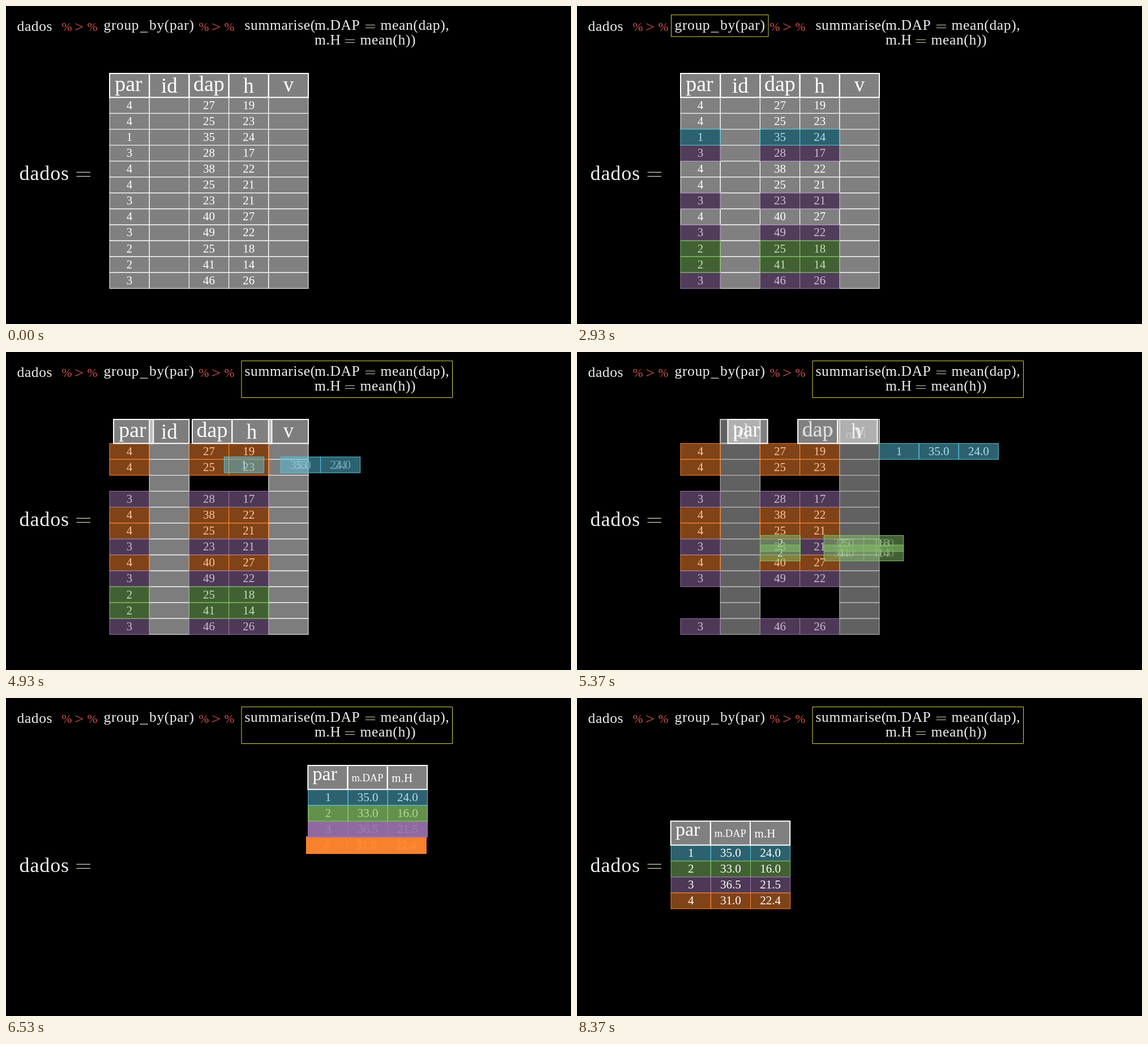
An HTML page that plays this animation: 998 by 561 pixels, repeating every 9110 ms.

```html
<!DOCTYPE html>
<html lang="pt">
<head>
<meta charset="utf-8">
<title>group_by + summarise</title>
<style>
  html, body { margin: 0; width: 100%; height: 100%; overflow: hidden; background: #000; }
  svg { display: block; width: 100%; height: 100%; }
  text { font-family: "Liberation Serif", "Noto Serif", serif; fill: #fff; white-space: pre; }
  .code { fill: #eee; }
  .pipe { fill: #d8544e; }
</style>
</head>
<body>
<svg id="stage" viewBox="0 0 998 561"></svg>
<script>
const LOOP = 9110;
const COL = 70.2, ROW = 28.08, HEAD = 42.3, LEFT = 183, TOP = 119, BODY = TOP + HEAD;
const OUT = 533.3;                       // left edge of the summary table
const COLORS = ['#58C4DD', '#83C167', '#9A72AC', '#FF862F'];
const DATA = [
  [4, 27, 19], [4, 25, 23], [1, 35, 24], [3, 28, 17], [4, 38, 22], [4, 25, 21],
  [3, 23, 21], [4, 40, 27], [3, 49, 22], [2, 25, 18], [2, 41, 14], [3, 46, 26]
];

// Timeline in ms
const STEP = 694, MOVE = 473;
const T = { box: 320, paint: 1014, jump: 3790, gather: 4680, head: 1792, clean: 6572, slide: 7505, slideFor: 700 };

const stage = document.getElementById('stage');

function el(tag, attrs, parent = stage) {
  const node = document.createElementNS('http://www.w3.org/2000/svg', tag);
  set(node, attrs);
  parent.appendChild(node);
  return node;
}
function set(node, attrs) {
  for (const k in attrs) node.setAttribute(k, attrs[k]);
}
function label(str, x, y, size, parent = stage, attrs = {}) {
  const node = el('text', { x, y, 'font-size': size, ...attrs }, parent);
  node.textContent = str;
  return node;
}
const centered = (str, x, y, size, parent) => label(str, x, y, size, parent, { 'text-anchor': 'middle' });
const box = (x, y, w, h, parent, color = '#fff', line = 1) =>
  el('rect', { x, y, width: w, height: h, fill: color, 'fill-opacity': 0.5, stroke: color, 'stroke-width': line }, parent);

const clamp = v => Math.max(0, Math.min(1, v));
const mix = (a, b, s) => a + (b - a) * s;
const sigmoid = x => 1 / (1 + Math.exp(-x));
function smooth(t) {
  const e = sigmoid(-5);
  return clamp((sigmoid(10 * (clamp(t) - 0.5)) - e) / (1 - 2 * e));
}
const phase = (now, start, span) => smooth((now - start) / span);
function tint(hex, s) {
  const n = parseInt(hex.slice(1), 16);
  return `rgb(${[n >> 16, n >> 8 & 255, n & 255].map(c => Math.round(mix(255, c, s)))})`;
}

// Code line
const code = (str, x, y, size = 25.5) => label(str, x, y, size, stage, { class: 'code', 'letter-spacing': size * 0.025 });
function equals(x, y, w, gap, h) {
  for (const dy of [0, gap]) el('rect', { x, y: y + dy, width: w, height: h, fill: '#cfcfb0' });
}
function pipe(x) {
  for (const dx of [0, 45]) label('%', x + dx, 44, 21.5, stage, { class: 'pipe' });
  el('path', { class: 'pipe', d: `M${x + 24} 30.5l14 6.2l-14 6.2v-1.3l11.4 -4.9l-11.4 -4.9z` });
}
code('dados', 19.5, 44);
pipe(98.5);
code('group', 172.5, 42.2);
el('rect', { class: 'code', x: 236.5, y: 45.5, width: 14, height: 1.2 });
code('by(par)', 253, 42.2);
pipe(340.5);
code('summarise(', 421.5, 41.7);
code('m.DAP', 545, 41.7);
equals(635, 33, 17, 5, 1);
code('mean(dap),', 661.5, 41.7);
code('m.H', 545, 68);
equals(599, 59, 17, 5, 1);
code('mean(h))', 625.5, 68);
code('dados', 23.5, 307, 36);
equals(124.5, 292.7, 24.5, 7.2, 1.3);

const frame = el('path', { fill: 'none', stroke: '#d6d648', 'stroke-width': 1, pathLength: 1 });

// Unused columns
const tableLayer = el('g', {});
const spare = el('g', {}, tableLayer);
for (const [col, name, dy] of [[1, 'id', 34], [4, 'v', 32]]) {
  const x = LEFT + col * COL;
  DATA.forEach((_, r) => box(x, BODY + r * ROW, COL, ROW, spare));
  box(x, TOP, COL, HEAD, spare, '#fff', 2);
  centered(name, x + COL / 2, TOP + dy, 37, spare);
}

// Group cells: the rectangles lie above the numbers
const SOURCE_COLS = [0, 2, 3];
const groups = COLORS.map((color, i) => {
  const rows = DATA.map((d, r) => ({ d, r })).filter(o => o.d[0] === i + 1);
  const mean = c => (rows.reduce((sum, o) => sum + o.d[c], 0) / rows.length).toFixed(1);
  return { color, rows, result: [String(i + 1), mean(1), mean(2)], cells: [] };
});
for (const g of [...groups].reverse()) {
  const words = el('g', {}, tableLayer), rects = el('g', {}, tableLayer);
  for (const { d, r } of g.rows) {
    d.forEach((value, k) => {
      const same = String(value) === g.result[k];
      g.cells.push({
        k, r,
        from: centered(value, 0, 0, 21, words),
        to: same ? null : centered(g.result[k], 0, 0, 21, words),
        rect: box(0, 0, COL, ROW, rects)
      });
    });
  }
}

// Headers: name, size, centre and baseline before and after
const HEADS = [
  { a: 'par', b: 'par', size: [38, 34], cx: [33.5, 30], dy: [31, 26] },
  { a: 'dap', b: 'm.DAP', size: [38, 18.5], cx: [35, 35], dy: [31, 28] },
  { a: 'h', b: 'm.H', size: [37, 21], cx: [35, 26], dy: [34, 28.5] }
];
const heads = HEADS.map((spec, k) => ({
  ...spec, k,
  rect: box(0, TOP, COL, HEAD, tableLayer, '#fff', 2),
  from: centered(spec.a, 0, 0, spec.size[0], tableLayer),
  to: spec.a === spec.b ? null : centered(spec.b, 0, 0, spec.size[1], tableLayer)
}));

// Finished summary table
const summary = el('g', {});
groups.forEach((g, i) => {
  g.result.forEach((str, k) => {
    const x = OUT + 0.5 + k * COL, y = BODY + i * ROW;
    box(x, y, COL, ROW, summary, g.color);
    centered(str, x + COL / 2, y + 20.5, 21, summary);
  });
});
HEADS.forEach((h, k) => {
  const x = OUT + k * COL;
  box(x, TOP, COL, HEAD, summary, '#fff', 2);
  centered(h.b, x + h.cx[1], TOP + h.dy[1], h.size[1], summary);
});

function swap(cell, s, attrs) {
  set(cell.from, { ...attrs, opacity: cell.to ? 1 - s : 1 });
  if (cell.to) set(cell.to, { ...attrs, opacity: s });
}

function drawFrame(now) {
  const drawn = phase(now, T.box, STEP), s = phase(now, T.jump, STEP);
  const x0 = mix(166.5, 416, s), x1 = mix(338, 788.5, s), y0 = 15.7, y1 = mix(54, 80.5, s);
  set(frame, {
    d: `M${x0} ${y0}H${x1}V${y1}H${x0}Z`,
    'stroke-dasharray': drawn < 1 ? `${drawn} 2` : 'none',
    visibility: drawn > 0 ? 'visible' : 'hidden'
  });
}

function drawGroup(g, i, now) {
  const paint = tint(g.color, phase(now, T.paint + i * STEP, STEP));
  const s = phase(now, T.gather + i * MOVE, MOVE);
  for (const cell of g.cells) {
    const x = mix(LEFT + SOURCE_COLS[cell.k] * COL, OUT + 0.5 + cell.k * COL, s);
    const y = mix(BODY + cell.r * ROW, BODY + i * ROW, s);
    set(cell.rect, { x, y, fill: paint, stroke: paint });
    swap(cell, s, { x: x + COL / 2, y: y + 20.5 });
  }
}

function drawHead(h, s) {
  const x = mix(LEFT + SOURCE_COLS[h.k] * COL, OUT + h.k * COL, s);
  set(h.rect, { x });
  swap(h, s, { x: x + mix(...h.cx, s), y: TOP + mix(...h.dy, s) });
  if (!h.to) set(h.from, { 'font-size': mix(...h.size, s) });
}

function render(now) {
  const clean = now >= T.clean;
  drawFrame(now);
  set(tableLayer, { visibility: clean ? 'hidden' : 'visible' });
  set(summary, { visibility: clean ? 'visible' : 'hidden' });
  if (clean) {
    const s = phase(now, T.slide, T.slideFor);
    set(summary, { transform: `translate(${-367.7 * s} ${98.2 * s})` });
    return;
  }
  const s = phase(now, T.gather, T.head);
  set(spare, { opacity: 1 - s });
  groups.forEach((g, i) => drawGroup(g, i, now));
  heads.forEach(h => drawHead(h, s));
}

const born = performance.now();
function tick() {
  render((performance.now() - born) % LOOP);
  requestAnimationFrame(tick);
}
tick();
</script>
</body>
</html>
```
